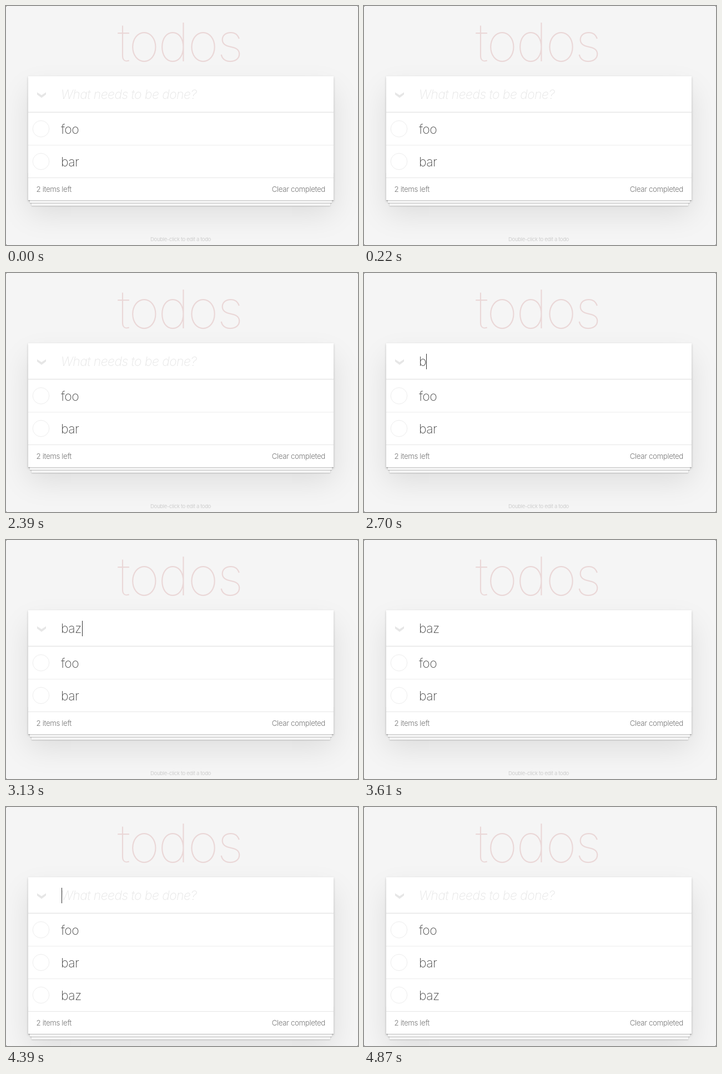
An HTML page for the animation above (5.56 s loop, 634x432 px).

```html
<!DOCTYPE html>
<html lang="en">
<head>
<meta charset="utf-8">
<title>todos</title>
<style>
  html, body { margin: 0; width: 100%; height: 100%; overflow: hidden; background: #555; }
  #stage { position: relative; width: 634px; height: 432px; overflow: hidden; background: #f5f5f5; border-radius: 2px; }
  #card {
    position: absolute; left: 40px; top: 127px; width: 550px; background: #fff;
    box-shadow: 0 2px 4px rgba(0,0,0,.2), 0 25px 50px rgba(0,0,0,.1);
  }
  #stack {
    position: absolute; left: 0; right: 0; bottom: 0; height: 50px;
    box-shadow: 0 1px 1px rgba(0,0,0,.2), 0 8px 0 -3px #f6f6f6, 0 9px 1px -3px rgba(0,0,0,.2),
      0 16px 0 -6px #f6f6f6, 0 17px 2px -6px rgba(0,0,0,.2);
  }
  #entry { height: 65px; box-shadow: inset 0 -2px 1px rgba(0,0,0,.03); }
  svg { position: absolute; left: 0; top: 0; }
  text { font-family: Inter, "Helvetica Neue", "Liberation Sans", sans-serif; white-space: pre; }
  .title { font-size: 96px; font-weight: 130; letter-spacing: -2.5px; fill: #ead7d7; text-anchor: middle; }
  .item { font-size: 23px; font-weight: 200; letter-spacing: -.55px; fill: #4d4d4d; }
  .hint { font-style: italic; fill: #e6e6e6; }
  .foot { font-size: 13.3px; font-weight: 300; letter-spacing: -.37px; fill: #777; }
  .note { font-size: 9.5px; font-weight: 300; letter-spacing: -.27px; fill: #c4c4c4; text-anchor: middle; }
  .end { text-anchor: end; }
  .ring { fill: none; stroke: #ededed; }
</style>
</head>
<body>
<div id="stage">
  <div id="card"><div id="stack"></div><div id="entry"></div></div>
  <svg width="634" height="432">
    <text class="title" x="313" y="100">todos</text>
    <path d="M56 156L64 161.3L72 156V160L64 166L56 160Z" fill="#e6e6e6"/>
    <text class="item hint" id="hint" x="99" y="168">What needs to be done?</text>
    <text class="item" id="typed" x="99" y="168"></text>
    <rect id="caret" y="146" width="1" height="28" fill="#333"/>
    <g id="rows"></g>
    <g id="footer">
      <rect x="40" y="310" width="550" height="1" fill="#e6e6e6"/>
      <text class="foot" x="54.5" y="336">2 items left</text>
      <text class="foot end" x="575" y="336">Clear completed</text>
      <text class="note" x="314.5" y="425">Double-click to edit a todo</text>
    </g>
  </svg>
</div>
<script>
const $ = id => document.getElementById(id);
const LOOP = 5560, ROW = 59;

// start time, typed text, caret shown, number of items
const states = [
  [0, '', false, 2],
  [1910, '', true, 2],
  [2390, '', false, 2],
  [2700, 'b', true, 2],
  [2780, 'ba', true, 2],
  [3130, 'baz', true, 2],
  [3610, 'baz', false, 2],
  [3650, '', true, 3],
  [4130, '', false, 3],
  [4390, '', true, 3],
  [4870, '', false, 3]
];

$('rows').innerHTML = ['foo', 'bar', 'baz'].map((name, i) => `
  <g transform="translate(0 ${i * ROW})">
    <rect x="40" y="192" width="550" height="1" fill="${i ? '#ededed' : '#e6e6e6'}"/>
    <circle class="ring" cx="63" cy="222" r="14.8"/>
    <text class="item" x="99" y="231">${name}</text>
  </g>`).join('');

const show = (el, on) => el.setAttribute('visibility', on ? 'visible' : 'hidden');
let shown;

function draw(now) {
  const state = states.findLast(s => s[0] <= now % LOOP);
  if (state !== shown) {
    shown = state;
    const [, text, caret, count] = state;
    $('typed').textContent = text;
    show($('hint'), !text);
    show($('caret'), caret);
    $('caret').setAttribute('x', Math.round(100 + 12.3 * text.length));
    show($('rows').children[2], count > 2);
    $('footer').setAttribute('transform', `translate(0 ${(count - 2) * ROW})`);
    $('card').style.height = 106 + count * ROW + 'px';
  }
  requestAnimationFrame(draw);
}
draw(0);
</script>
</body>
</html>
```
